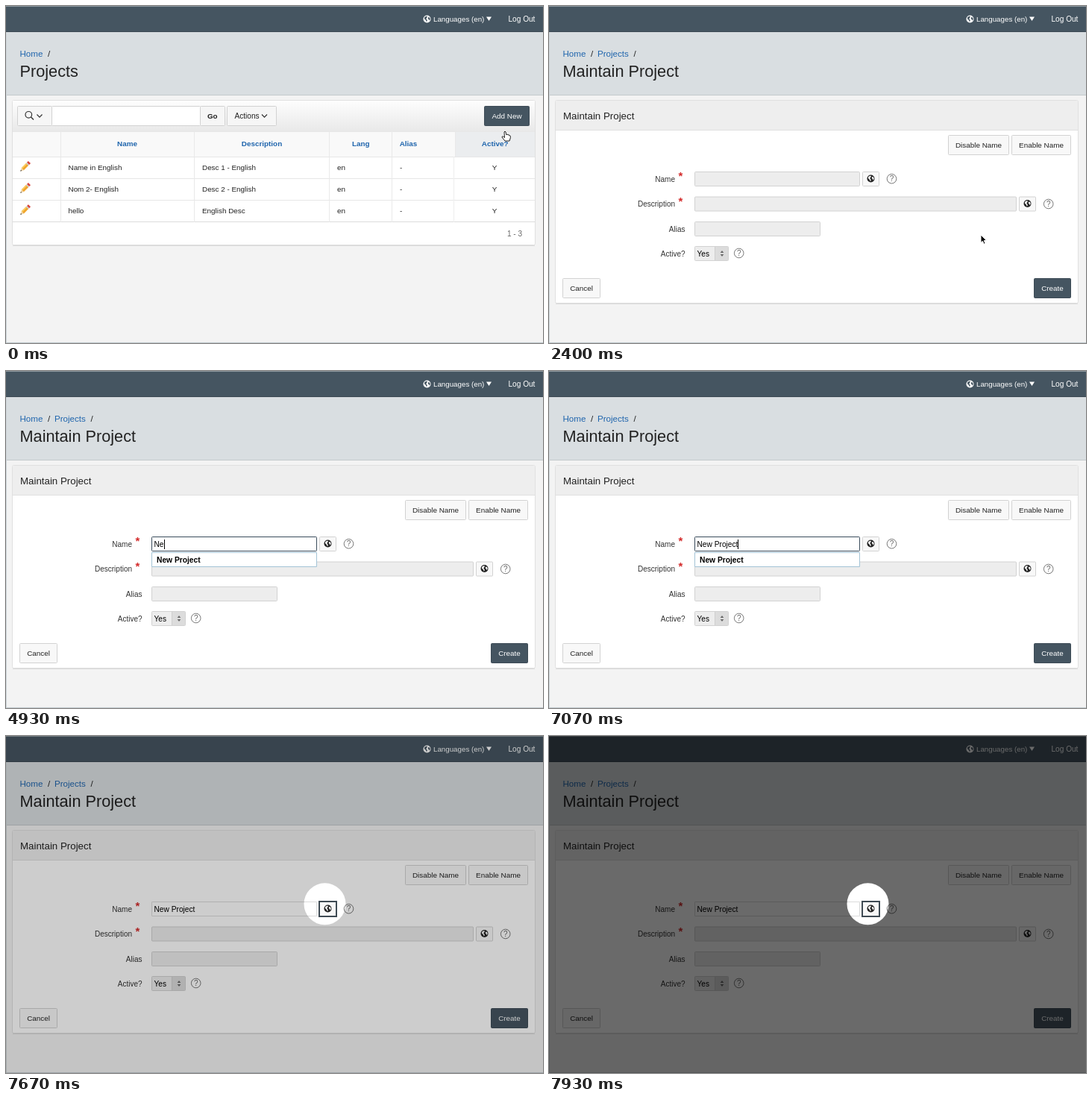
Animation, 720 px wide and 452 px high, one loop 8000 ms. Source, as an HTML page with a canvas:

```html
<!DOCTYPE html>
<html lang="en">
<head>
<meta charset="utf-8">
<title>Project form</title>
<style>
html, body { margin: 0; width: 100%; height: 100%; overflow: hidden; background: #f3f3f3; }
canvas { display: block; width: 720px; height: 452px; }
</style>
</head>
<body>
<canvas id="stage"></canvas>
<script>
const W = 720, H = 452, LOOP = 8000, TICK = 1000 / 15;
const SLATE = '#455561', BLUE = '#1f65ad', INK = '#222', EDGE = '#d2d2d2', GREY = '#ededed';
const canvas = document.getElementById('stage');
const ratio = window.devicePixelRatio || 1;
canvas.width = W * ratio;
canvas.height = H * ratio;
const c = canvas.getContext('2d');

const TYPED = 'New Project';
const KEYS = [4270, 4930, 5130, 5400, 5730, 6130, 6270, 6530, 6600, 6800, 7070];
const OPEN = 2130, FOCUS = 3730, SUGGEST = 4670, SPOT = 7530;

// Pointer stops: time, x, y
const STOPS = [
  [0, 669, 168], [200, 672, 147], [2130, 672, 147], [2400, 579, 307],
  [2730, 579, 307], [3330, 412, 233]
];

function rect(x, y, w, h, fill) {
  c.fillStyle = fill;
  c.fillRect(x, y, w, h);
}

function box(x, y, w, h, fill, edge = EDGE, r = 1) {
  c.beginPath();
  c.roundRect(x + .5, y + .5, w - 1, h - 1, r);
  c.fillStyle = fill;
  c.fill();
  c.lineWidth = 1;
  c.strokeStyle = edge;
  c.stroke();
}

function text(s, x, y, { size = 9.9, color = INK, bold = false, align = 'left' } = {}) {
  c.font = `${bold ? 'bold ' : ''}${size}px "Liberation Sans", Arial, sans-serif`;
  c.fillStyle = color;
  c.textAlign = align;
  c.fillText(s, x, y);
}

function line(points, color, width = 1) {
  c.beginPath();
  points.forEach(([x, y]) => c.lineTo(x, y));
  c.lineWidth = width;
  c.strokeStyle = color;
  c.stroke();
}

function poly(points, fill) {
  c.beginPath();
  points.forEach(([x, y]) => c.lineTo(x, y));
  c.closePath();
  c.fillStyle = fill;
  c.fill();
}

function at(x, y, draw) {
  c.save();
  c.translate(x, y);
  draw();
  c.restore();
}

function button(label, x, y, w, h, dark) {
  box(x, y, w, h, dark ? SLATE : '#f8f8f8', dark ? '#3d4b56' : EDGE);
  text(label, x + w / 2, y + h / 2 + 3.6, { color: dark ? '#fff' : INK, align: 'center' });
}

function chevron(x, y) {
  line([[x - 3.5, y - 1.8], [x, y + 1.8], [x + 3.5, y - 1.8]], '#333', 1.2);
}

function globe(x, y, color, land) {
  at(x, y, () => {
    c.beginPath();
    c.arc(0, 0, 5, 0, 7);
    c.fillStyle = color;
    c.fill();
    poly([[-3.6, -2], [-1.5, -3.8], [.6, -3.6], [-.2, -2], [-1.2, -.6], [-.4, .8], [.4, 2], [-.6, 3.8], [-1.6, 1.4], [-3.4, -.2]], land);
    poly([[1.8, -2.4], [3.6, -2], [4.2, .2], [3.2, 2.2], [2.4, .4], [1.2, -.6]], land);
  });
}

function help(x, y) {
  c.beginPath();
  c.arc(x, y, 6.3, 0, 7);
  c.lineWidth = 1;
  c.strokeStyle = '#777';
  c.stroke();
  text('?', x, y + 3.5, { size: 10, color: '#666', align: 'center' });
}

function pencil(x, y) {
  at(x, y, () => {
    c.rotate(-Math.PI / 4);
    rect(-4.5, -2.2, 9, 4.4, '#f0a52c');
    rect(-4.5, -2.2, 9, 1.6, '#fbd063');
    rect(4.2, -2.2, 1.6, 4.4, '#c9ccd0');
    rect(5.8, -2.2, 2.6, 4.4, '#d9453c');
    poly([[-4.5, -2.2], [-8.8, 0], [-4.5, 2.2]], '#efd3a4');
    poly([[-7, -.9], [-8.8, 0], [-7, .9]], '#333');
  });
}

function frame(title, crumbs) {
  rect(0, 0, W, H, '#f3f3f3');
  rect(0, 0, W, 35, SLATE);
  rect(0, 0, W, 1, '#8d979e');
  rect(0, 34, W, 1, '#3d4a54');
  globe(564.5, 17.5, '#fff', SLATE);
  text('Languages (en)', 573, 21, { size: 9.75, color: '#fff' });
  poly([[644, 14.5], [651, 14.5], [647.5, 20]], '#fff');
  text('Log Out', 673.5, 21, { size: 10.1, color: '#fff' });
  rect(0, 35, W, 84, '#d9dee1');
  rect(0, 119, W, 1, '#c4c9cc');
  crumbs.forEach(([s, x, slash]) => {
    text(s, x, 68, { size: 11.6, color: BLUE });
    text('/', slash, 68, { size: 11.6 });
  });
  text(title, 18.5, 94.5, { size: 21.7 });
}

function edges() {
  rect(0, 35, 1, H - 35, '#cdd4d8');
  rect(0, H - 1, W, 1, '#c5ced2');
}

function panel(h) {
  rect(9, 127 + h, 700, 1, '#d9d9d9');
  box(8, 126, 702, h + 1, '#fff', '#e0e0e0', 2);
}

function listPage(t) {
  frame('Projects', [['Home', 18.5, 56]]);
  panel(194);
  const bar = c.createLinearGradient(0, 127, 0, 168);
  bar.addColorStop(0, '#fdfdfd');
  bar.addColorStop(1, '#e9e9e9');
  rect(9, 127, 700, 41, bar);

  box(15, 134, 47, 27, '#f6f6f6');
  c.beginPath();
  c.arc(30.3, 145.8, 4.3, 0, 7);
  c.lineWidth = 1.2;
  c.strokeStyle = '#333';
  c.stroke();
  line([[33.5, 149], [37, 152.5]], '#333', 1.4);
  chevron(45, 147.3);
  box(61, 134, 200, 27, '#fff');
  box(260, 134, 34, 27, '#f6f6f6');
  text('Go', 276.7, 151, { size: 9.8, bold: true, align: 'center' });
  box(296, 134, 67, 27, '#f6f6f6');
  text('Actions', 306.5, 151, { size: 10.1 });
  chevron(346.5, 147.3);
  if (t >= 1530) {
    c.beginPath();
    c.roundRect(639, 132, 65, 31, 2);
    c.fillStyle = '#a5b4be';
    c.fill();
  }
  button('Add New', 641, 134, 61, 27, true);

  rect(9, 168, 700, 34, '#f9f9f9');
  if (t < 70) rect(602, 168, 107, 34, '#ebedef');
  [168, 202, 231, 260, 289].forEach(y => rect(9, y, 700, 1, y === 289 ? '#dcdcdc' : '#e7e7e7'));
  [73, 252, 433, 517].forEach(x => rect(x, 168, 1, 122, '#e9e9e9'));
  rect(602, 168, 1, 34, '#e9e9e9');
  rect(600, 202, 1, 88, '#eee');
  const head = { color: BLUE, bold: true, align: 'center' };
  [['Name', 162.5], ['Description', 343], ['Lang', 475.7], ['Alias', 539.5], ['Active?', 655.7]]
    .forEach(([s, x]) => text(s, x, 188, head));

  const rows = [['Name in English', 'Desc 1 - English'], ['Nom 2- English', 'Desc 2 - English'], ['hello', 'English Desc']];
  rows.forEach(([name, desc], i) => {
    const y = 219.5 + i * 29.1;
    pencil(25.5, y - 4);
    text(name, 83.5, y);
    text(desc, 263, y);
    text('en', 444, y);
    text('-', 528, y);
    text('Y', 655, y, { align: 'center' });
  });
  text('1 - 3', 672, 309, { size: 10, color: '#666' });
  edges();
}

function field(label, right, y, w, required) {
  text(label, right, y + 13.5, { size: 10, color: '#333', align: 'right' });
  if (required) text('*', 176.3, y + 11, { size: 15, bold: true, color: '#d32a2a', align: 'center' });
  box(195, y, w, 20, GREY);
}

function globeButton(x, y, focused) {
  box(x, y, 23, 20, '#f8f8f8');
  if (focused) {
    c.lineWidth = 2;
    c.strokeStyle = '#3f4b54';
    c.strokeRect(x, y, 23, 20);
  }
  globe(x + 11.5, y + 9.5, '#222', '#f8f8f8');
}

function nameInput(t) {
  if (t < FOCUS) return;
  const active = t < SPOT;
  const typed = TYPED.slice(0, KEYS.filter(k => k <= t).length);
  box(195, 222, 222, 20, '#fff', active ? '#3a4c5c' : '#dcdcdc');
  text(typed, 198.5, 236, { size: 10.2, color: '#000' });
  if (!active) return;
  rect(Math.round(198.5 + c.measureText(typed).width), 226, 1, 13, '#000');
  if (t >= SUGGEST) {
    box(195, 243, 222, 20, '#fff', '#a3c3d6', 0);
    text(TYPED, 202, 257, { size: 10.25, bold: true, color: '#000' });
  }
}

function formPage(t) {
  frame('Maintain Project', [['Home', 18.5, 56], ['Projects', 65, 113.5]]);
  panel(272);
  rect(9, 127, 700, 39, '#eee');
  rect(9, 166, 700, 1, '#e0e0e0');
  text('Maintain Project', 19, 151.5, { size: 13.3 });
  button('Disable Name', 535, 173, 82, 27);
  button('Enable Name', 620, 173, 80, 27);

  field('Name', 169, 222, 222, true);
  globeButton(420, 222, t >= SPOT);
  help(459.5, 231.7);
  field('Description', 169, 255.5, 432, true);
  globeButton(630, 255.5);
  help(669.7, 265.5);
  field('Alias', 182.5, 289, 169);
  field('Active?', 182.5, 322, 46);
  rect(223, 323, 17, 18, '#dcdcdc');
  rect(222, 323, 1, 18, '#cfcfcf');
  text('Yes', 198.5, 335.5, { size: 10.1, color: '#000' });
  poly([[229.7, 331], [232, 328], [234.3, 331]], '#666');
  poly([[229.7, 333], [232, 336], [234.3, 333]], '#666');
  help(254.7, 331.5);
  button('Cancel', 18, 365, 51, 27);
  button('Create', 650, 365, 50, 27, true);
  nameInput(t);
  edges();
}

function spotlight(t) {
  const shade = Math.max(0, Math.min(.6, (t - 7540) * .0015));
  c.beginPath();
  c.rect(0, 0, W, H);
  c.arc(427.5, 225.3, 28, 0, 7);
  c.fillStyle = `rgba(0,0,0,${shade})`;
  c.fill('evenodd');
}

function pointerAt(t) {
  const i = STOPS.findIndex(s => s[0] > t);
  if (i < 0) return STOPS[STOPS.length - 1].slice(1);
  const [t0, x0, y0] = STOPS[i - 1], [t1, x1, y1] = STOPS[i];
  const p = (t - t0) / (t1 - t0), e = p * p * (3 - 2 * p);
  return [x0 + (x1 - x0) * e, y0 + (y1 - y0) * e];
}

function shape(path, fill, edge) {
  const p = new Path2D(path);
  c.lineJoin = 'round';
  c.lineWidth = 1;
  c.fillStyle = fill;
  c.strokeStyle = edge;
  c.fill(p);
  c.stroke(p);
}

const hand = () => shape('M-1 1Q0-1 1 1L2 5L3 4Q4 4 4 5L5 4.6Q6 5 6 6L7 6Q8 7 7 10L6 13H0L-4 8Q-4 6.5-2.5 7L-.5 8.5Z', '#fff', '#222');
const arrow = () => shape('M0 0V10.5L2.4 8.3L4.2 12.3L6 11.5L4.3 7.6H7.6Z', '#000', '#fff');

function beam() {
  line([[0, -6], [0, 6]], '#222');
  line([[-2.5, -6.5], [2.5, -6.5]], '#222');
  line([[-2.5, 6.5], [2.5, 6.5]], '#222');
}

function pointer(t) {
  if (t >= KEYS[0]) return;
  const [x, y] = pointerAt(t);
  const inField = (x < 416 && y > 222 && y < 242) || (x < 627 && y > 256 && y < 276);
  at(x, y, t < OPEN ? hand : inField ? beam : arrow);
}

function draw(now) {
  const tick = Math.floor((now % LOOP + 5) / TICK) % 120;
  const t = Math.round(tick * TICK / 10) * 10;
  c.setTransform(ratio, 0, 0, ratio, 0, 0);
  if (t < OPEN) listPage(t);
  else formPage(t);
  pointer(t);
  if (t >= SPOT) spotlight(t);
}

const start = performance.now();
function loop() {
  draw(performance.now() - start);
  requestAnimationFrame(loop);
}
loop();
</script>
</body>
</html>
```
